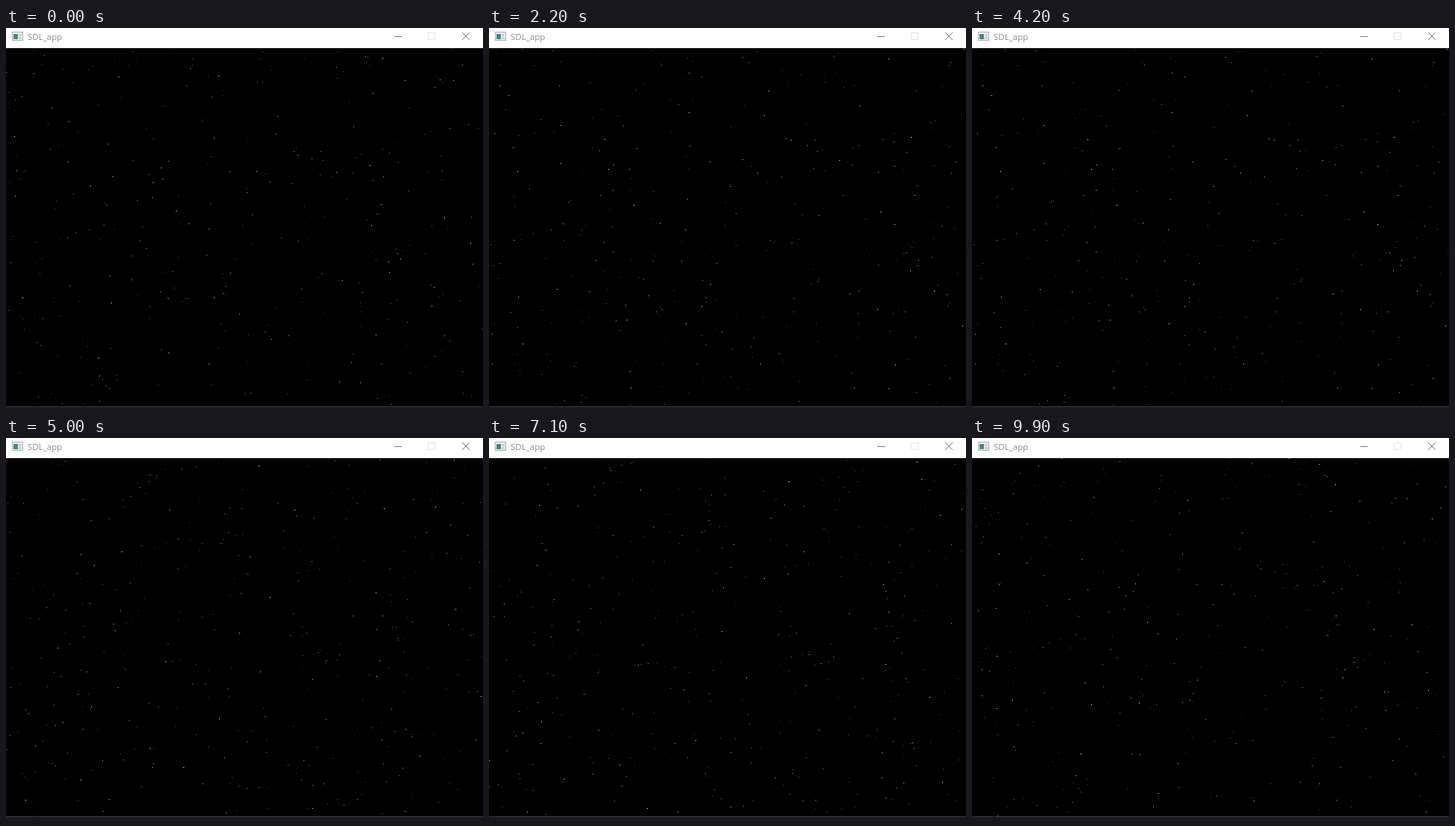
An HTML page with a canvas that plays this animation: 640x512 px, repeating every 9.95 s.

```html
<!DOCTYPE html>
<html lang="en">
<head>
<meta charset="utf-8">
<title>SDL_app</title>
<style>
  html, body { margin: 0; width: 100%; height: 100%; overflow: hidden; background: #1b1819; }
  svg, canvas { position: absolute; left: 0; display: block; }
  svg { top: 0; }
  canvas { top: 27px; background: #000; }
  hr { position: absolute; left: 0; top: 507px; width: 640px; height: 1px; margin: 0; border: 0; background: #3d3839; }
  text { font: 11.5px "Open Sans", "Noto Sans", sans-serif; fill: #8c8c8c; }
</style>
</head>
<body>
<svg width="640" height="27" fill="none">
  <rect width="640" height="27" fill="#fff"/>
  <rect x="8.5" y="5.5" width="14" height="11" fill="#f2f4f4" stroke="#a3aaaa"/>
  <rect x="10" y="8" width="6" height="7" fill="#4b8580"/>
  <path d="M17 8h4v3h-4zM17 12h4v3h-4z" fill="#c9cfcf"/>
  <text x="29" y="16">SDL_app</text>
  <path d="M521 11.5h10" stroke="#777"/>
  <rect x="566.5" y="6.5" width="9" height="9" stroke="#e6e6e6"/>
  <path d="M612 6l10 10m0-10l-10 10" stroke="#777"/>
</svg>
<canvas width="640" height="480"></canvas>
<hr>
<script>
const ctx = document.querySelector('canvas').getContext('2d');
const LOOP = 9950, TICK = 50, STEPS_PER_MS = 15 / 1000;
const DEPTH = 30; // steps a star needs to fly from the far plane to the viewer
const COUNT = 1000;

let seed = 7;
const random = () => (seed = (seed * 1664525 + 1013904223) % 2 ** 32) / 2 ** 32;
const spread = halfSize => (random() * 2 - 1) * halfSize * DEPTH;

// The field exactly fills the view at the far plane.
const stars = Array.from({ length: COUNT }, () => ({
  x: spread(320), y: spread(240), z: random() * DEPTH
}));

function draw(step) {
  ctx.clearRect(0, 0, 640, 480);
  for (const star of stars) {
    const z = (star.z - step % DEPTH + DEPTH) % DEPTH || DEPTH;
    const shade = Math.round(255 * Math.min(1, 1.3 - 1.1 * z / DEPTH));
    ctx.fillStyle = `rgb(${shade}, ${shade}, ${shade})`;
    ctx.fillRect(Math.floor(320 + star.x / z), Math.floor(240 + star.y / z), 1, 1);
  }
}

// 15 steps a second, each starting on a 50 ms tick.
function frame() {
  const tick = Math.floor(performance.now() % LOOP / TICK);
  draw(Math.floor(((tick + 1) * TICK - 0.01) * STEPS_PER_MS));
  requestAnimationFrame(frame);
}
frame();
</script>
</body>
</html>
```
